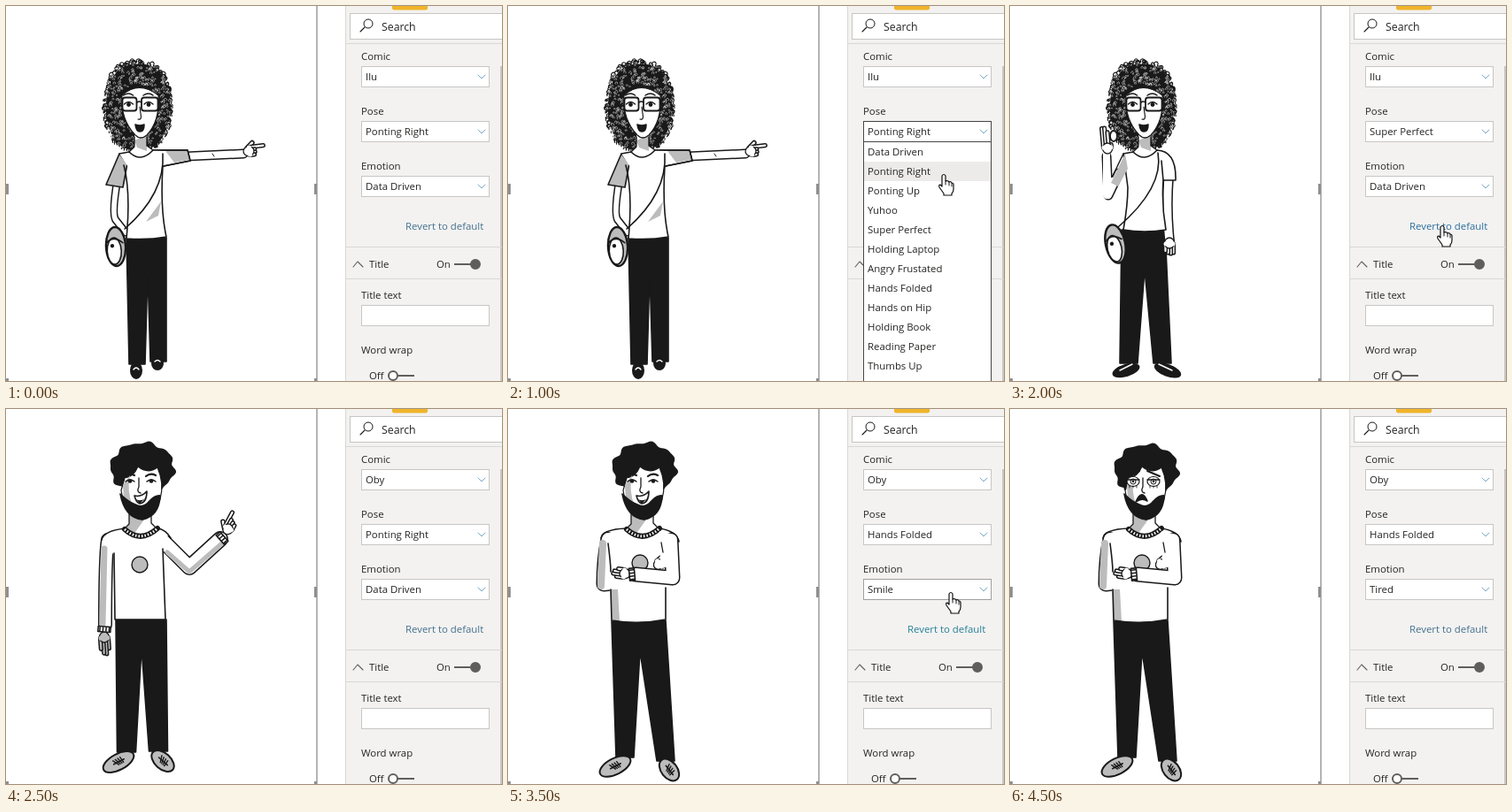
These frames come from a looping animation (560 by 424 pixels, 5 s). An HTML page:

```html
<!DOCTYPE html>
<html lang="en">
<head>
<meta charset="utf-8">
<title>Comic settings</title>
<style>
html, body { margin: 0; width: 100%; height: 100%; overflow: hidden; background: #fff; }
svg { display: block; width: 560px; height: 424px; }
text { font: 11.4px "Open Sans", "Noto Sans", sans-serif; fill: #252423; white-space: pre; }
</style>
</head>
<body>
<svg id="stage" viewBox="0 0 560 424"></svg>
<script>
const INK = '#191919', GREY = '#bcbcbc', DARK = '#605e5c', EDGE = '#c8c6c4', RULE = '#dad8d6';
const STEP = 500, LOOP = 5000;

// Drawing helpers
const path = (d, fill = 'none', stroke = INK, w = 1.6) =>
  `<path d="${d}" fill="${fill}" stroke="${stroke}" stroke-width="${w}" stroke-linecap="round" stroke-linejoin="round"/>`;
const line = (d, w) => path(d, 'none', INK, w);
const fill = (d, colour = '#fff') => path(d, colour, 'none');
const oval = (x, y, rx, ry = rx, colour = INK, w = 0, deg = 0) =>
  `<ellipse cx="${x}" cy="${y}" rx="${rx}" ry="${ry}" fill="${colour}" stroke="${INK}" stroke-width="${w}" transform="rotate(${deg} ${x} ${y})"/>`;
const limb = (d, w, colour = '#fff') => line(d, w + 3) + path(d, 'none', colour, w);
const place = (x, y, deg, art) => `<g transform="translate(${x} ${y}) rotate(${deg})">${art}</g>`;
const repeat = (n, f) => Array.from({ length: n }, (_, i) => f(i)).join('');

function random(seed) {
  return () => (seed = (seed * 16807) % 2147483647) / 2147483647;
}

// Body parts shared by all figures
function legs(left, right, y, lx, ly, rx, ry, w, mid, crotch) {
  return path(`M${left},${y}H${right}L${rx + w},${ry}H${rx - w}L${mid},${crotch}L${lx + w},${ly}H${lx - w}Z`, INK);
}
const hand = (x, y, deg, fingers, thumb = false, colour = '#fff') => place(x, y, deg,
  (thumb ? limb('M-2,-4L4,-9', 2.6, colour) : '') +
  fingers.map((len, i) => limb(`M0,${i * 3 - 4.5}h${len}`, 2.2, colour)).join('') +
  oval(-1, 0, 6, 5.5, colour, 1.3) + path('M0,-4v8', 'none', colour, 5));
const shoe = (x, y, rx, ry, deg) => oval(x, y, rx, ry, GREY, 2, deg) +
  place(x, y, deg, repeat(4, i => line(`M${i * 3 - 5},-4l${4 - i},7`, 1.4)) + line('M-6,0h13', 1.6));

// Curly hair: a ragged rim of dark curls over a solid mass, with light flecks
function curls() {
  const rnd = random(77);
  const spot = (a, k) => [
    149 + 38 * k * Math.sign(Math.cos(a)) * Math.abs(Math.cos(a)) ** .75, 114 + 51 * k * Math.sin(a)];
  const ring = (n, min, size) => repeat(n, () => {
    const [x, y] = spot(rnd() * 6.283, min + rnd() * (1 - min)), r = size * (.5 + rnd());
    return `M${x - r},${y}a${r},${r} 0 1 1 ${r * 1.6},${r * (rnd() - .3)}`;
  });
  return fill('M' + repeat(60, i => spot(i / 60 * 6.283, .95) + ' ') + 'Z', INK) +
    line(ring(190, .93, 1.7), 1.1) + path(ring(330, .5, 1.1), 'none', '#f2f2f2', .55);
}

const lens = (x, w) => `<rect x="${x}" y="103.500" width="${w}" height="15" rx="3" fill="none" stroke="${INK}" stroke-width="1.8"/>`;
const herEye = x => oval(x, 111.5, 2.4) + line(`M${x - 5},111q5,-5 10,0`, 1.4) + line(`M${x - 6},101q6,-4 11,0`, 1.5);
const herHead = curls() +
  fill('M145,140V160L139,165Q152,178 166,163L159,158V140Z') + fill('M145,152L159,146V164L148,160Z', GREY) +
  line('M145,148V159L139,165M159,148V158L166,163', 1.3) +
  path('M131,101Q150,84 172,101Q174,130 159,146Q152,152 146,146Q129,128 131,101Z', '#fff', INK, 1.2) +
  lens(131.5, 16) + lens(153, 18.5) + line('M148,109q2,-2 5,0M172,108l5,-2') +
  herEye(138.5) + herEye(161) + line('M151,114l1.500,11q0,4 -3.500,3', 1.2) +
  path('M146,134q5,2 10,0q0,8 -5,8q-4,0 -5,-8z', INK);

const bag = (x, y, deg) => place(x, y, deg,
  oval(0, 0, 11, 22, GREY, 2.4) + oval(-2, 5, 8, 15, '#fff', 1.6) + line('M-10,-5Q-2,-13 8,-4', 1.8) + oval(-4, -1, 2.2));

const womanRight = herHead +
  legs(136, 181, 262, 148, 405, 172, 402, 9, 160, 300) +
  oval(147, 412, 7, 10) + oval(171, 404, 7, 8) + path('M144,411q3,-4 6,0M168,402q3,-3 6,0', 'none', '#fff', 1.4) +
  limb('M126,195Q119,236 124,242L135,256', 6) +
  limb('M182,171L268,167', 8) + hand(275, 164, -7, [16, 6, 6, 5], true) + line('M233,167l2,3', 1) +
  path('M128,167L113,202L132,205L137,178Z', GREY) +
  path('M166,163L205,163L208,175L178,181', '#fff') + fill('M180,164H204L207,174L190,177Z', GREY) +
  path('M139,165L128,167L138,182Q140,232 136,263Q160,265 181,261Q174,230 177,181L181,164L166,163Q152,178 139,165Z', '#fff', 'none') +
  fill('M158,244L175,221L172,237Z', GREY) +
  line('M139,165L128,167M133,180Q141,210 136,263Q160,265 181,261Q174,230 177,181M139,165Q152,178 166,163H205L208,175L178,181') +
  line('M177,167Q180,212 134,252') + bag(124, 272, -3);

const womanPerfect = herHead +
  legs(126, 175, 253, 134, 404, 172, 404, 10, 152, 298) +
  oval(131, 412, 16, 7, INK, 0, -17) + oval(178, 412, 16, 7, INK, 0, 20) +
  path('M124,412L138,405M168,405L183,412', 'none', '#fff', 1.5) +
  limb('M179,192Q176,230 180,266', 9) + hand(180, 269, 90, [10, 11, 10, 8]) +
  path('M139,165L128,167L133,205Q133,225 128,253Q152,257 176,253Q171,225 173,197H187Q188,164 166,163Q152,178 139,165Z', '#fff') +
  limb('M123,189L111,214L109,170', 8) + path('M116,198L109,214V164', 'none', '#fff', 8) +
  fill('M130,167L114,200L122,204L133,184Z', GREY) + line('M128,167L116,192', 1.4) +
  hand(110, 160, -95, [22, 22, 17, 3]) + oval(117, 147, 4, 6, '#fff', 1.8) +
  line('M171,175L173,197M167,166Q174,205 122,250') + bag(119, 269, -12);

// The bearded figure
const mop = y => fill('M' + repeat(90, i => {
  const a = i / 90 * 6.283, r = 1 + .045 * Math.sin(8 * a) + .03 * Math.sin(13 * a);
  return `${154 + 36 * r * Math.cos(a)},${y + 67 + 29 * r * Math.sin(a)} `;
}) + 'Z', INK);
const hisHead = (face, y = 0) => mop(y) +
  fill('M139,115V129L133,136Q152,154 170,135L164,129V115Z') + fill('M139,118V130L134,136L144,142L156,125Z', GREY) +
  line('M139,118V130L133,136M164,118V129L170,135', 1.3) +
  path('M130,92L134,78Q144,77 149,65Q160,74 171,66Q179,84 174,102Q168,122 153,125Q134,121 130,92Z', '#fff', INK, 1.2) +
  fill('M132,86L140,75Q136,92 143,110L133,102Z', GREY) +
  path('M129,96Q138,105 146,108Q155,113 162,104Q169,97 174,98Q173,121 154,125Q134,123 129,96Z', INK) + face;

const nose = line('M150,78V88Q147,94 152,95', 1.3);
const happyEye = x => line(`M${x - 6},76q5,-4 11,-1`, 2.2) + line(`M${x - 5},82q5,-4 10,0`, 1.4) + oval(x, 81.5, 2.3);
const happy = happyEye(140) + happyEye(164) + nose +
  path('M145,98Q153,100 159,93Q159,106 151,107Q147,106 145,98Z', '#fff') + fill('M147,102Q152,105 157,101L151,107Z', INK);
const tiredEye = (x, tilt) => oval(x, 82, 7, 5.5, '#fff', 1.2) + oval(x, 82, 3, 3, '#fff', 1) + oval(x, 82, 1.3) +
  line(`M${x - 7},80h14`, 1.4) + line(`M${x - 7},${73 + tilt}L${x + 7},${73 - tilt}`, 2) +
  repeat(3, i => line(`M${x - 4 + i * 4},87v2`, .8));
const tired = tiredEye(139, 3) + tiredEye(162, -3) + nose +
  path('M142,105Q149,89 155,104Q149,100 142,105Z', INK) + oval(130, 89, 1.5, 3);

const neckline = 'M134,136Q152,152 171,135';
const collar = line(neckline, 6) +
  `<path d="${neckline}" fill="none" stroke="#fff" stroke-width="3" stroke-dasharray="1.500 2"/>`;
const badge = (x, y) => oval(x, y, 9, 9, GREY, 1.4);
const cuff = (x, y, deg) => place(x, y, deg,
  path('M-7,-3H7V3H-7Z', '#fff') + repeat(4, i => line(`M${i * 3.5 - 5},-2v4`, 1.5)));

const manPoint = hisHead(happy) +
  legs(124, 181, 238, 136, 388, 172, 387, 10.5, 153, 270) + shoe(127, 399, 19, 9, -28) + shoe(177, 398, 15, 9, 42) +
  hand(111, 259, 86, [12, 18, 17, 12], false, GREY) +
  limb('M115,148Q112,165 112,244', 13) + path('M111,158L109,243', 'none', GREY, 7) +
  limb('M178,150L207,179L242,147', 15) + path('M182,162L207,184L246,150', 'none', GREY, 5) +
  fill('M134,135L112,141L123,170V238H180L177,166L183,142L171,135Q152,152 134,135Z') +
  line('M134,135Q110,138 108,148M122,163L123,238H180L177,158M171,135Q180,136 186,146') +
  collar + badge(151, 176) + cuff(111, 249, 4) +
  hand(251, 135, -62, [18, 10, 8, 6], true) + cuff(244, 146, 48);

const manFolded = (face, y) => hisHead(face, y) +
  legs(117, 178, 239, 132, 394, 178, 398, 10, 149, 274) + shoe(121, 404, 19, 9, -27) + shoe(182, 408, 14, 9, 52) +
  limb('M113,147Q108,170 108,198L145,194', 14) + path('M107,152L105,200', 'none', GREY, 8) +
  fill('M134,135L113,140L116,239Q148,244 178,238L184,140L171,135Q152,152 134,135Z') +
  fill('M116,204H124L126,240H117Z', GREY) +
  line('M134,135Q106,136 105,146M113,152Q116,175 116,184M116,204L117,239Q148,244 178,238V202M171,135Q191,138 193,150') +
  collar + badge(149, 174) +
  hand(171, 175, -40, [13, 17, 16, 12]) +
  limb('M184,148L186,191L144,187', 14) + fill('M171,138L184,141V178L172,180Z') + line('M173,151L175,162', 1.3) +
  hand(131, 186, 188, [8, 12, 11, 7]) + cuff(140, 187, 85);

const figures = {
  womanRight, womanPerfect, manPoint, manSmile: manFolded(happy), manTired: manFolded(tired, 2)
};

// Settings pane
const rect = (x, y, w, h, colour) => `<rect x="${x}" y="${y}" width="${w}" height="${h}" fill="${colour}"/>`;
const box = (x, y, w, h, edge = EDGE) => rect(x, y, w, h, edge) + rect(x + 1, y + 1, w - 2, h - 2, '#fff');
const text = (x, y, s, style = '') => `<text x="${x}" y="${y}" style="${style}">${s}</text>`;
const field = (y, label, value, edge) => text(401, y - 7, label) + box(401, y, 145, 24, edge) +
  (value ? text(406, y + 16, value) + path(`M533,${y + 10}l4,4l4,-4`, 'none', '#7caac4', 1) : '');
const list = (y, items, hot) => box(401, y - 1, 145, items.length * 22 + 3, '#484644') +
  items.map((s, i) => (i === hot ? rect(402, y + i * 22, 143, 22, '#edebe9') : '') +
    text(406, y + i * 22 + 15, s)).join('');
const toggle = (x, y, knob, colour) => rect(x, y - 1, 24, 2, DARK) +
  `<circle cx="${knob}" cy="${y}" r="5" fill="${colour}" stroke="${DARK}" stroke-width="2"/>`;

const poses = ['Data Driven', 'Ponting Right', 'Ponting Up', 'Yuhoo', 'Super Perfect', 'Holding Laptop',
  'Angry Frustated', 'Hands Folded', 'Hands on Hip', 'Holding Book', 'Reading Paper', 'Thumbs Up', 'Waving'];
const moods = ['Data Driven', 'Smile', 'Angry', 'Sad', 'Tired'];

const pointer = ([x, y]) => place(x, y, 0,
  path('M-2,2Q0,-1 2,2V8Q5,7 6,9Q8,8 9,10Q11,10 11,12V17Q11,20 9,22V24H0V22L-5,15Q-6,12 -4,12L-2,14Z', '#fff', '#111', 1.2) +
  line('M2,8v4M6,9v4M9,10v4', 1));

const canvasEdge = rect(350, 0, 2, 424, '#b4b4b4') +
  [0, 348].map(x => rect(x, 201, 3, 12, '#8f8f8f') + rect(x, 421, 3, 3, '#8f8f8f')).join('');

function pane(s) {
  const edge = part => s.open === part ? '#484644' : undefined;
  return rect(383, 0, 177, 424, '#f3f2f1') + rect(383, 0, 1, 424, RULE) +
    '<rect x="436" y="-3" width="40" height="7.500" rx="2" fill="#f0b429"/>' +
    box(388, 8, 176, 30) + oval(409, 20, 5, 5, 'none', 1) + line('M405,24l-5,5', 1.1) +
    text(424, 28, 'Search', 'font-size:12.3px') + rect(558, 68, 2, 356, EDGE) +
    [42, 272, 308].map(y => rect(384, y, 176, 1, RULE)).join('') +
    field(68, 'Comic', s.comic) + field(130, 'Pose', s.pose, edge('pose')) +
    field(192, 'Emotion', s.mood, edge('mood') || s.edge) +
    text(451, 253, 'Revert to default', `fill:${s.link || '#44708c'}`) +
    path('M392,295l5,-6l6,6', 'none', DARK, 1.1) + text(410, 296, 'Title') +
    text(486, 296, 'On') + toggle(506, 292, 530, DARK) +
    field(338, 'Title text') + text(401, 393, 'Word wrap') +
    text(410, 422, 'Off') + toggle(437, 418, 437, '#fff') +
    (s.open === 'pose' ? list(154, poses, s.hot) : '') +
    (s.open === 'mood' ? list(216, moods, s.hot) : '') +
    (s.tip ? box(487, 275, 80, 19, '#767676') + text(493, 288, s.tip, 'fill:#575757') : '') +
    (s.cursor ? pointer(s.cursor) : '');
}

const her = { figure: 'womanRight', comic: 'Ilu', pose: 'Ponting Right', mood: 'Data Driven' };
const him = { ...her, figure: 'manPoint', comic: 'Oby' };
const folded = { figure: 'manSmile', comic: 'Oby', pose: 'Hands Folded', mood: 'Smile' };
const scenes = [
  her,
  { ...her, open: 'pose', hot: 1, cursor: [501, 143] },
  { ...her, open: 'pose', hot: 1, cursor: [492, 190] },
  { ...her, open: 'pose', hot: 4, cursor: [488, 248], tip: 'Super Perfect' },
  { ...her, figure: 'womanPerfect', pose: 'Super Perfect', link: '#2a6d9c', cursor: [488, 248] },
  him,
  { ...him, open: 'pose', hot: 1, cursor: [502, 148] },
  { ...folded, link: '#267f94', edge: '#a19f9d', cursor: [500, 207] },
  { ...folded, open: 'mood', hot: 1, cursor: [500, 207] },
  { ...folded, figure: 'manTired', mood: 'Tired' }
];

const stage = document.getElementById('stage');
const start = performance.now();
let shown = -1;
function draw() {
  const i = Math.floor(((performance.now() - start) % LOOP) / STEP);
  if (i !== shown) {
    shown = i;
    stage.innerHTML = figures[scenes[i].figure] + canvasEdge + pane(scenes[i]);
  }
  requestAnimationFrame(draw);
}
draw();
</script>
</body>
</html>
```
